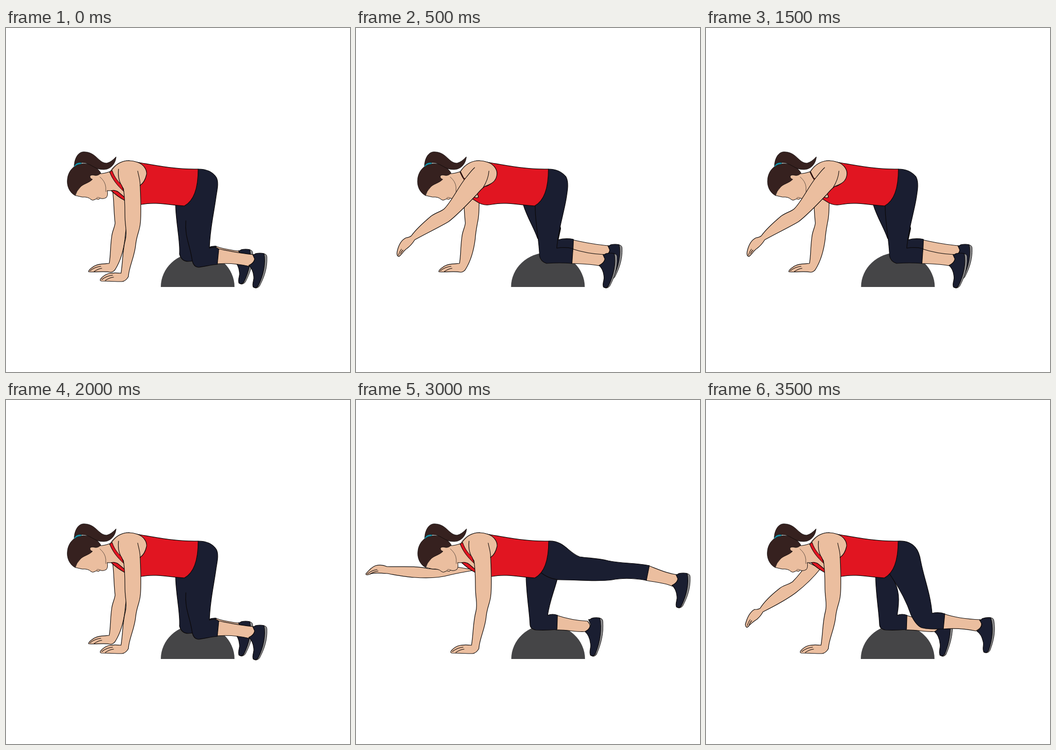
These frames come from a looping animation (700 px wide and 700 px high, 4000 ms). An HTML page with a canvas:

```html
<!DOCTYPE html>
<html lang="en">
<head>
<meta charset="utf-8">
<title>Balance exercise</title>
<style>
html, body { margin: 0; width: 100%; height: 100%; overflow: hidden; background: #fff; }
canvas { display: block; }
</style>
</head>
<body>
<canvas id="stage" width="700" height="700"></canvas>
<script>
const ctx = document.getElementById('stage').getContext('2d');
const SKIN = '#ebbe9f', RED = '#e11521', NAVY = '#1a1e31', HAIR = '#36211f',
      BALL = '#454547', TEAL = '#1796ae', SOLE = '#8b8b8d', INK = '#0b0808';

function fill(d, color, line = 1.2) {
  const path = new Path2D(d);
  ctx.fillStyle = color;
  ctx.fill(path);
  if (line) stroke(path, line);
}

function stroke(d, width = 1.2) {
  ctx.strokeStyle = INK;
  ctx.lineWidth = width;
  ctx.stroke(d instanceof Path2D ? d : new Path2D(d));
}

// Shoulder cap shared by the raised positions of the near arm.
const SHOULDER = 'M212 292C222 277 234 270 250 270Q259 270 267 273C282 278 288 290 286 300C284 312 276 317 ';

const nearArms = {
  down: {
    shape: 'M250 270Q259 270 267 273C282 278 287 290 286 298C283 311 278 317 273 320' +
      'C274 348 276 378 273 400C271 415 266 422 264 440C262 465 250 486 249 506Q244 515 236 516' +
      'C222 516 207 515 194 515Q190 514 193 510C202 500 210 497 234 499C238 475 237 452 243 430' +
      'C247 414 242 405 242 380C242 358 241 340 239 327C231 315 227 304 229 287',
    under: 'M212 292C222 277 234 270 250 270L262 300L239 327C226 315 220 304 216 291Z',
    lines: 'M214 291C224 276 236 270 250 270M268 291C270 302 273 308 273 321M195 512Q205 504 217 503M202 514Q210 508 219 507'
  },
  half: {
    shape: SHOULDER + '262 322C256 326 250 333 245 339C228 357 205 381 188 394C168 406 140 419 119 431' +
      'Q113 441 104 448C96 453 93 461 87 465Q82 464 83 456C86 441 91 432 101 427Q108 426 112 423' +
      'C122 409 139 394 152 383C163 375 172 374 179 368C194 353 207 325 222 306L219 306Z',
    lines: 'M241 284C234 290 228 299 222 306M270 291C269 304 265 314 258 325M86 462Q88 455 92 450M90 459Q92 455 95 452'
  },
  out: {
    shape: SHOULDER + '266 322C250 328 236 322 208 330C181 338 152 340 122 336C101 334 84 330 66 328' +
      'C52 327 41 329 32 332Q25 336 22 334Q21 331 27 324C34 314 42 311 52 312L66 315' +
      'C93 311 119 312 143 310C163 309 179 307 191 302Q201 298 212 292Z',
    lines: 'M190 302C212 295 229 282 244 280Q252 279 259 281M24 332Q34 323 43 321M29 333Q37 326 45 325'
  }
};

const farArms = {
  down: {
    shape: 'M217 332C220 352 219 371 222 397C221 406 216 414 215 425C212 446 213 464 210 479' +
      'C196 480 184 480 176 487Q168 492 168 496C183 498 196 494 213 497Q220 496 223 490' +
      'C234 472 239 453 242 430C243 415 245 406 247 395C251 377 250 360 250 340Z',
    lines: 'M171 494Q181 486 193 485M179 496Q187 490 195 489'
  },
  half: {
    shape: 'M206 330C201 342 186 360 176 370C166 377 158 376 149 384C135 395 120 408 110 424' +
      'Q105 427 99 426C88 432 83 445 80 457Q81 464 85 462C91 455 96 451 104 446Q111 440 116 431' +
      'C138 420 163 407 183 392C201 378 218 362 233 343Z',
    lines: 'M84 459Q86 452 90 447M88 457Q90 452 93 449'
  },
  out: {
    shape: 'M205 340C187 347 160 345 145 343C118 337 90 340 62 339Q51 334 39 337C29 341 23 349 19 354' +
      'Q20 358 28 354C39 350 50 353 62 353C80 356 99 360 118 361C144 363 169 362 190 356C207 352 224 349 242 346Z',
    lines: 'M22 354Q32 346 42 345M28 354Q36 349 44 348'
  }
};

// Each leg: shin, trousers and shoe placement [x, y, height factor, turn].
const tuckedShoe = [-30, -15, 1.1, -0.04];
const tuckedShin = 'M407 438C428 445 449 449 470 450Q482 462 466 471C448 473 428 467 406 468Z';
const tuckedFront = 'M345 345L345 360C346 398 352 431 353 456Q353 466 365 468Q386 469 408 467L409 438Q399 434 389 438';
const bentShin = 'M438 449C462 457 481 460 504 461Q512 475 496 484C476 480 458 480 438 479Z';
const farLegs = {
  kneel: {
    shin: 'M426 444C440 449 457 452 474 454Q484 468 470 480L426 474Z',
    pants: 'M345 345L345 360C346 398 355 435 353 460Q357 475 371 475L425 470L428 444Q420 443 411 447L391 335',
    shoe: [-29, -8, 1, 0]
  },
  back: {
    shin: 'M440 431C467 437 488 441 513 443Q522 458 505 467C480 464 462 465 440 455Z',
    pants: 'M336 345L340 360C348 386 361 405 369 428L402 460L441 456L442 430Q426 427 411 431L416 408L400 340',
    shoe: [10, -18, 1, 0]
  },
  raised: {
    shin: 'M574 352C594 358 612 369 634 372Q642 386 622 394C604 387 588 387 569 383Z',
    pants: 'M350 352Q360 369 372 370L422 383C452 384 488 384 514 382C536 376 550 382 570 384L576 352' +
      'C548 346 520 351 493 347C470 344 449 338 429 331L400 320',
    shoe: [129, -91, 1, -0.03]
  },
  tucked: { shin: tuckedShin, pants: tuckedFront + 'C394 407 394 386 380 363L392 335', shoe: tuckedShoe },
  wide: { shin: tuckedShin, pants: tuckedFront + 'C393 410 401 393 409 363L385 335', shoe: tuckedShoe }
};

const nearLegs = {
  kneel: {
    shin: 'M430 449C456 454 478 459 504 461Q512 475 495 485C474 480 452 478 428 480Z',
    pants: 'M366 392C363 425 375 442 379 474Q382 486 391 487C404 486 415 482 430 481L433 450' +
      'Q426 444 414 448C415 410 422 382 427 347C429 331 434 315 428 304Q417 287 391 287',
    shoe: [0, 0, 1, 0]
  },
  planted: {
    shin: bentShin,
    pants: 'M364 350L364 360C364 398 372 429 373 464Q375 475 387 479Q414 477 439 479L441 449Q425 445 408 448' +
      'C411 411 421 383 427 349C430 330 433 315 427 303Q414 287 391 287',
    shoe: [0, 0, 1, 0]
  },
  back: {
    shin: 'M484 435C507 443 531 446 558 447Q566 462 549 470C526 465 506 464 482 466Z',
    pants: 'M371 350L379 362C395 386 408 410 417 437Q427 458 438 463C450 467 467 466 483 466L486 435' +
      'Q473 431 460 434C457 395 444 364 437 328Q434 309 426 300Q414 286 391 287',
    shoe: [54, -15, 1, -0.12]
  },
  raised: {
    shin: 'M594 337C615 345 632 353 654 356Q660 371 643 379C624 371 608 371 589 367Z',
    pants: 'M374 350Q391 365 417 366C454 366 489 370 520 366C545 361 567 363 590 367L596 337' +
      'C567 331 540 333 512 327C491 322 475 322 454 319C431 311 423 286 391 287',
    shoe: [148, -106, 1, 0]
  }
};

const poses = {
  rest:    { nearArm: 'down', farArm: 'down', nearLeg: 'kneel',   farLeg: 'kneel',  shift: 0 },
  reachA:  { nearArm: 'half', farArm: 'down', nearLeg: 'planted', farLeg: 'back',   shift: 0.5 },
  extendA: { nearArm: 'out',  farArm: 'down', nearLeg: 'planted', farLeg: 'raised', shift: 0 },
  reachB:  { nearArm: 'down', farArm: 'half', nearLeg: 'back',    farLeg: 'tucked', shift: 0 },
  extendB: { nearArm: 'down', farArm: 'out',  nearLeg: 'raised',  farLeg: 'wide',   shift: 1 }
};
const sequence = ['rest', 'reachA', 'extendA', 'reachA', 'rest', 'reachB', 'extendB', 'reachB'];
const STEP = 500;

function drawBall() {
  ctx.fillStyle = BALL;
  ctx.beginPath();
  ctx.ellipse(390, 527, 75, 70, 0, Math.PI, 0);
  ctx.fill();
}

function drawArm({ shape, under, lines }) {
  if (under) fill(under, SKIN, 0);
  fill(shape, SKIN);
  stroke(lines, 1.1);
}

function drawShoe([x, y, tall, turn]) {
  ctx.save();
  ctx.translate(x + 515, y + 458);
  ctx.rotate(turn);
  ctx.scale(1, tall);
  ctx.translate(-515, -458);
  fill('M522 459Q531 459 531 466C532 489 525 508 516 525Q512 530 507 529Z', SOLE, 0.9);
  fill('M502 461Q505 462 508 459Q517 457 525 459C529 478 524 503 513 525Q508 531 503 527' +
    'C500 518 506 513 504 505C503 494 500 488 494 483Q504 479 506 470Z', NAVY);
  ctx.restore();
}

function drawLeg({ shin, pants, shoe }) {
  fill(shin, SKIN);
  fill(pants, NAVY);
  drawShoe(shoe);
}

function drawTorso() {
  fill('M188 297Q202 296 212 292C222 277 234 270 250 270L267 273L282 310L250 347L214 331L205 332L190 312Z', SKIN, 0);
  stroke('M188 297Q202 296 212 292C222 277 234 270 250 270L267 273M205 331L214 331');
  fill('M266 273C308 280 345 288 391 287C391 318 386 350 363 362C334 361 306 353 276 359' +
    'C257 363 248 355 240 350Q227 343 214 331Q222 329 229 334L242 345Q250 347 248 341Q243 332 236 326' +
    'C224 317 216 305 211 293L216 290C221 304 227 314 239 321L265 322C288 311 292 287 266 273Z', RED);
}

function drawHead() {
  fill('M172 300L192 297L204 311L206 332Q208 341 204 345Q197 349 191 346Q189 351 183 348' +
    'Q177 352 173 349Q167 343 155 344L142 341L145 320Z', SKIN, 0);
  stroke('M206 331Q208 341 204 345Q197 349 191 346Q190 350 186 348Q183 347 181 349Q176 352 173 349Q167 343 155 344L142 341', 1);
  stroke('M191 303Q202 312 203 324L203 333M191 346Q187 343 184 346', 0.6);
  fill('M141 341C129 335 123 321 125 307C127 290 139 277 157 276C175 275 187 285 193 295' +
    'Q188 301 181 300Q174 298 171 301Q170 306 176 308C168 316 157 317 151 324Q143 332 141 341Z', HAIR, 0.8);
  fill('M139 277C141 261 149 251 160 252C184 253 188 275 205 275Q214 273 224 262' +
    'C223 277 212 288 199 288C179 289 172 273 154 274Q146 274 139 280Z', HAIR, 0.8);
  fill('M138 282Q143 272 154 274L153 277Q144 277 139 283Z', TEAL, 0.4);
}

// A lowered arm leaves the shoulder strap visible in front of it.
function drawStrap() {
  fill('M211 293L216 290C221 305 229 313 235 319L240 333C226 320 217 309 211 293Z', RED, 1);
}

function drawPose({ nearArm, farArm, nearLeg, farLeg, shift }) {
  ctx.setTransform(1, 0, 0, 1, 0, 0);
  ctx.fillStyle = '#fff';
  ctx.fillRect(0, 0, 700, 700);
  ctx.translate(shift, 0);
  ctx.lineJoin = ctx.lineCap = 'round';
  drawBall();
  drawArm(farArms[farArm]);
  drawLeg(farLegs[farLeg]);
  drawLeg(nearLegs[nearLeg]);
  drawTorso();
  drawHead();
  drawArm(nearArms[nearArm]);
  if (nearArm === 'down') drawStrap();
}

function frame(now) {
  const step = Math.floor(now / STEP) % sequence.length;
  drawPose(poses[sequence[step]]);
  requestAnimationFrame(frame);
}

frame(performance.now());
</script>
</body>
</html>
```
